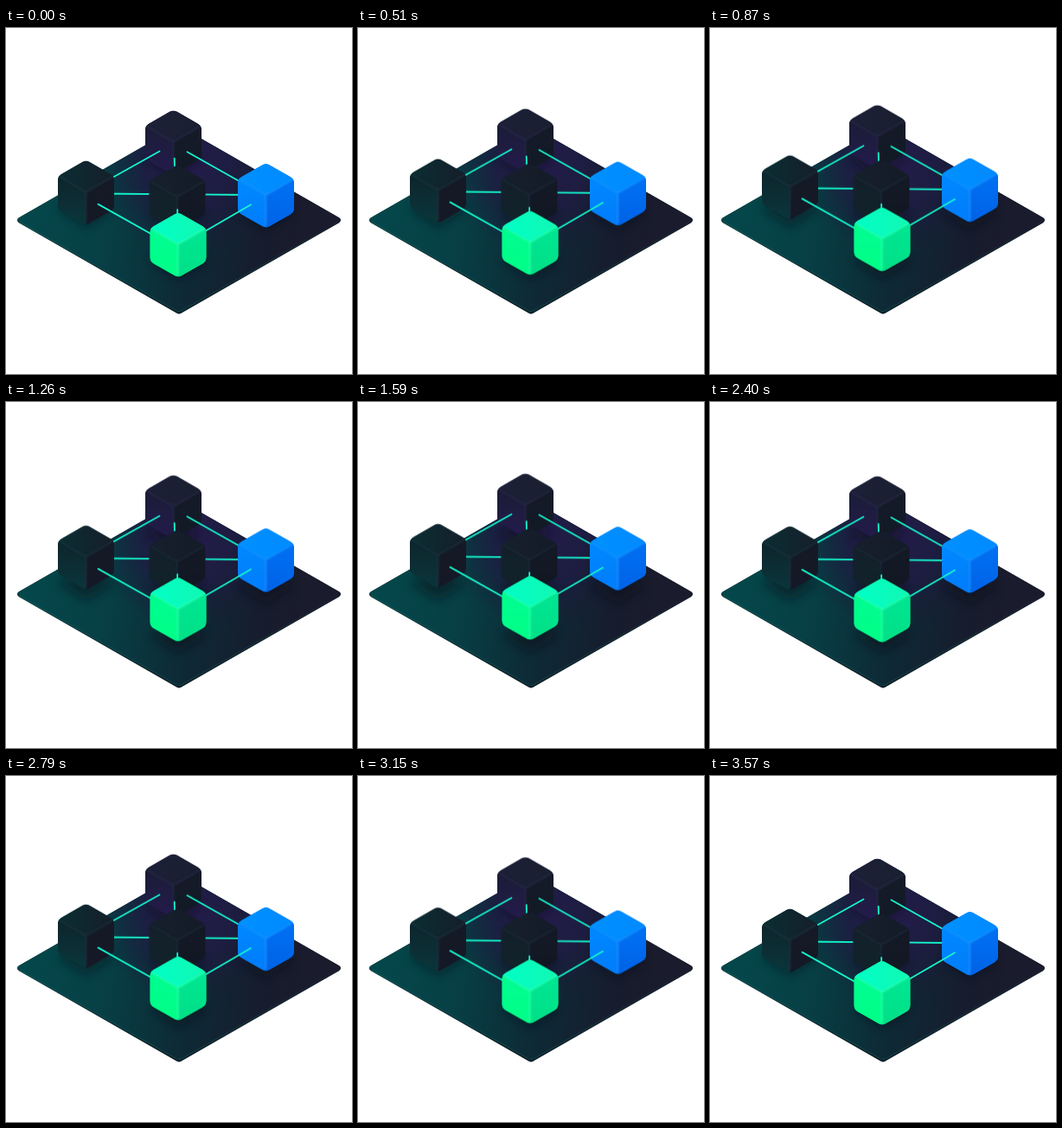
An HTML page that plays this animation: 400x400 px, repeating every 3600 ms.

```html
<!DOCTYPE html>
<html lang="en">
<head>
<meta charset="utf-8">
<title>Floating network</title>
<style>
  html, body { margin: 0; width: 100%; height: 100%; overflow: hidden; background: #fff; }
  svg { display: block; width: 100vw; height: 100vh; }
  .link { stroke: #14f7cd; stroke-width: 1.8; stroke-linecap: round; }
</style>
</head>
<body>
<svg id="stage" viewBox="0 0 400 400">
  <defs>
    <linearGradient id="floor" gradientUnits="userSpaceOnUse" x1="30" y1="210" x2="340" y2="250">
      <stop offset="0" stop-color="#04474a"/>
      <stop offset=".28" stop-color="#073f45"/>
      <stop offset=".6" stop-color="#0e2935"/>
      <stop offset=".85" stop-color="#161d2e"/>
      <stop offset="1" stop-color="#1a1b2c"/>
    </linearGradient>
    <radialGradient id="violet" gradientUnits="userSpaceOnUse" cx="212" cy="158" r="105">
      <stop offset="0" stop-color="#251c4c"/>
      <stop offset=".5" stop-color="#1f1b43" stop-opacity=".85"/>
      <stop offset="1" stop-color="#1a1a38" stop-opacity="0"/>
    </radialGradient>
    <linearGradient id="rim" gradientUnits="userSpaceOnUse" x1="13" y1="0" x2="387" y2="0">
      <stop offset="0" stop-color="#0d5454"/>
      <stop offset=".3" stop-color="#0a474a"/>
      <stop offset=".5" stop-color="#123a42"/>
      <stop offset="1" stop-color="#1d1e30"/>
    </linearGradient>
    <clipPath id="slab"><path id="slab-top" d="M200 113.3 385 219.2Q388.5 221.3 385 223.6L203 326.6Q200 328.4 197 326.6L15 223.6Q11.5 221.3 15 219.2Z"/></clipPath>
    <filter id="soft" x="-50%" y="-50%" width="200%" height="200%"><feGaussianBlur stdDeviation="6"/></filter>
    <filter id="edge" filterUnits="userSpaceOnUse" x="-40" y="-10" width="80" height="100"><feGaussianBlur stdDeviation=".8"/></filter>
  </defs>
  <path d="M200 113.3 385 219.2Q389 222 385 225.2L203 329.6Q200 331.4 197 329.6L15 225.2Q11 222 15 219.2Z" fill="#0b1c24"/>
  <use href="#slab-top" fill="url(#floor)"/>
  <use href="#slab-top" fill="url(#violet)"/>
  <path d="M15 224 197 326.8Q200 328.4 203 326.8L385 224" fill="none" stroke="url(#rim)" stroke-width="1.5"/>
  <g id="shadows" clip-path="url(#slab)"></g>
  <g id="net"></g>
</svg>
<script>
const LOOP = 3600, PEAK = 1770, LIFT = 13;
const W = 32.5, H = 18.5, D = 38.5;

// Each face is a pair of gradient colours; x, y give the top corner.
const cubes = {
  back:   { x: 193.5, y: 94.4,  top: ['#1d2038', '#191f2f'], left: ['#1b1d36', '#241b4e'], right: ['#161a28', '#111a26'], glow: '#2b2d4c' },
  left:   { x: 92.5,  y: 152.6, top: ['#0b2e33', '#161e2a'], left: ['#0e252c', '#0a363b'], right: ['#151a26', '#151826'], glow: '#233443' },
  centre: { x: 198,   y: 158.2, top: ['#16202c', '#151b28'], left: ['#14202a', '#10232b'], right: ['#141926', '#111822'], glow: '#232d3e' },
  blue:   { x: 300.5, y: 156,   top: ['#0091ff', '#008aff'], left: ['#0089ff', '#007cfb'], right: ['#0071f4', '#0062e6'], glow: '#1f96ff' },
  green:  { x: 199,   y: 213,   top: ['#00ffc6', '#12f8b4'], left: ['#00fc92', '#00ff86'], right: ['#00e695', '#00e085'], glow: '#30ffb0' }
};

const T = [0, 0], L = [-W, H], R = [W, H], M = [0, 2 * H];
const LB = [-W, H + D], RB = [W, H + D], B = [0, 2 * H + D];
const poly = pts => 'M' + pts.map(p => p.join(' ')).join('L') + 'Z';

function rounded(pts, r) {
  const toward = (a, b) => {
    const k = r / Math.hypot(b[0] - a[0], b[1] - a[1]);
    return [a[0] + (b[0] - a[0]) * k, a[1] + (b[1] - a[1]) * k].join(' ');
  };
  const n = pts.length;
  return pts.map((p, i) =>
    `${i ? 'L' : 'M'}${toward(p, pts[(i + n - 1) % n])}Q${p.join(' ')} ${toward(p, pts[(i + 1) % n])}`).join('') + 'Z';
}

const hull = rounded([T, R, RB, B, LB, L], 5);
const ridge = `M${2 - W} ${H + 1}L-3 ${2 * H - 1.5}Q0 ${2 * H} 3 ${2 * H - 1.5}L${W - 2} ${H + 1}M0 ${2 * H}V${2 * H + D - 3}`;

function cube(name) {
  const c = cubes[name];
  const face = (side, pts, dir) => `
    <linearGradient id="${name}-${side}" ${dir}>
      <stop stop-color="${c[side][0]}"/><stop offset="1" stop-color="${c[side][1]}"/>
    </linearGradient>
    <path d="${poly(pts)}" fill="url(#${name}-${side})"/>`;
  const down = 'x1="0" y1="0" x2="0" y2="1"';
  return `<g transform="translate(${c.x} ${c.y})">
    <clipPath id="${name}-hull"><path d="${hull}"/></clipPath>
    <path d="${hull}" fill="${c.left[1]}"/>
    <g clip-path="url(#${name}-hull)">
      ${face('left', [L, M, B, LB], down)}
      ${face('right', [M, R, RB, B], down)}
      ${face('top', [T, R, M, L], 'x1="0" y1="0" x2="1" y2="0"')}
      <path d="${ridge}" fill="none" stroke="${c.glow}" stroke-width="2" opacity=".65" filter="url(#edge)"/>
    </g></g>`;
}

const link = (x1, y1, x2, y2) => `<path class="link" d="M${x1} ${y1}L${x2} ${y2}"/>`;

const net = document.getElementById('net');
net.innerHTML = [
  cube('back'),
  link(177.5, 142.5, 110, 180.3),
  link(209.5, 143.2, 285, 185.8),
  link(194.7, 150.7, 195.2, 170),
  link(110, 191.5, 185, 192.2),
  link(215, 192.4, 285, 193),
  cube('left'), cube('blue'), cube('centre'),
  link(106.5, 203.6, 185, 247.8),
  link(283, 204.2, 215, 243.7),
  link(198.2, 210, 198.2, 225),
  cube('green')
].join('');

document.getElementById('shadows').innerHTML = Object.values(cubes).map(c =>
  `<path transform="translate(${c.x} ${c.y + D})" d="${poly([T, [W, H], [0, 2 * H + 2], [-W, H]])}"
    fill="#080d18" opacity=".45" filter="url(#soft)"/>`).join('');

const pose = (y, offset) => ({ transform: `translateY(${y}px)`, offset, easing: 'ease-in-out' });
net.animate([pose(0, 0), pose(-LIFT, PEAK / LOOP), pose(0, 1)], { duration: LOOP, iterations: Infinity });
</script>
</body>
</html>
```
